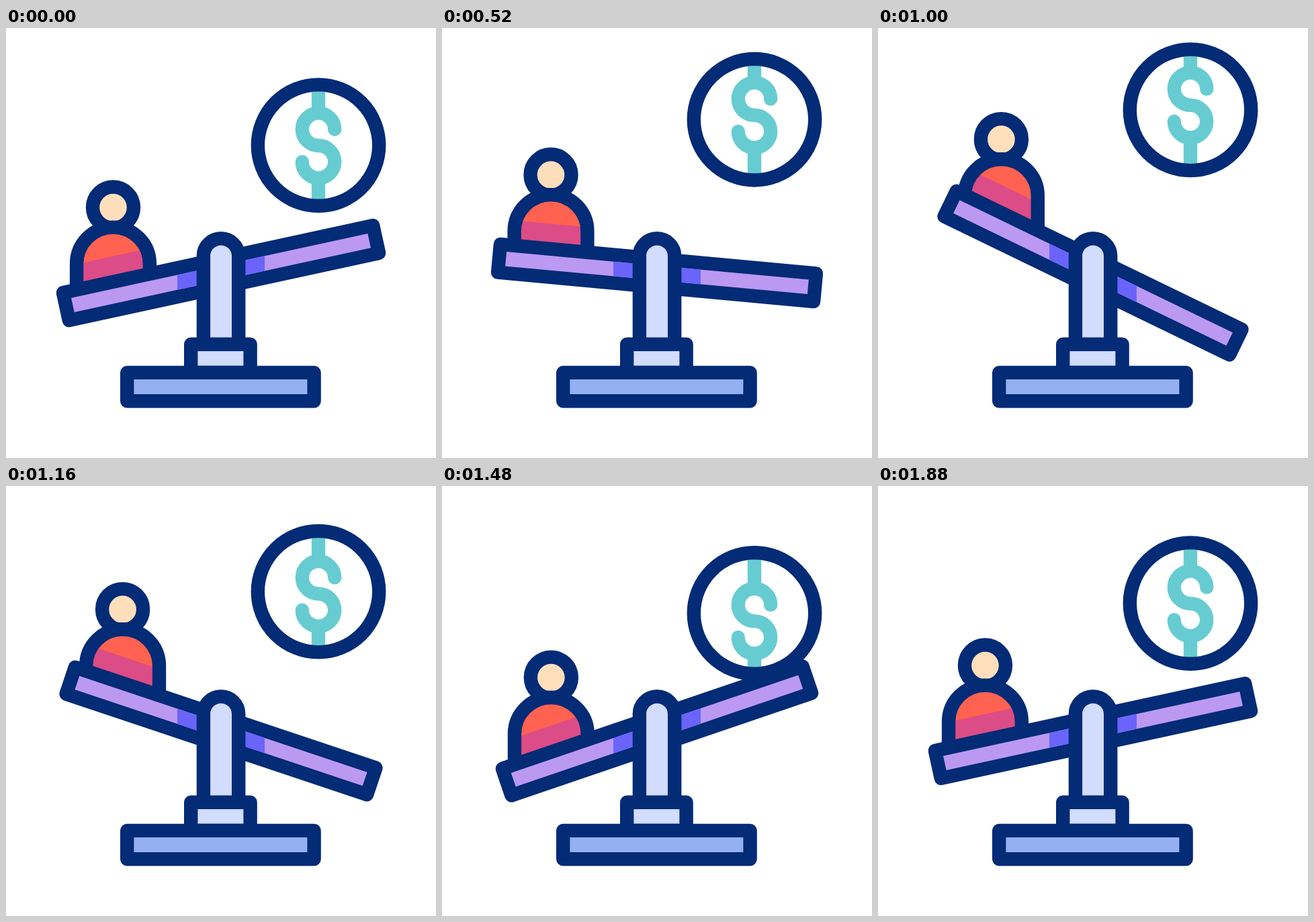
An HTML page with a canvas that plays this animation: 640 by 640 pixels, repeating every 2000 ms.

```html
<!DOCTYPE html>
<html lang="en">
<head>
<meta charset="utf-8">
<title>Seesaw</title>
<style>
  html, body { margin: 0; width: 100%; height: 100%; overflow: hidden; background: #fff; }
  canvas { display: block; width: 100vw; height: 100vh; }
</style>
</head>
<body>
<canvas id="stage"></canvas>
<script>
const SIZE = 640, LOOP = 2000, STEP = 40, LINE = 20.4;
const NAVY = '#042b76', TEAL = '#67ccd1', ORANGE = '#ff6250', PINK = '#dc4c86',
      SKIN = '#ffdfbb', LILAC = '#bb99f2', VIOLET = '#6a64fa', PALE = '#d2dcfd', BLUE = '#94b0f2';

const PIVOT = { x: 320, y: 364.5 };
const COIN = { x: 465, y: 174.6, r: 90.2 };

// Tracks: [time, value] pairs joined by sine easing
const TILT = [[56, 12.25], [1036, -26], [1499, 19], [1880, 12.25]];
const COIN_Y = [[28, 0], [885, -62.3], [1390, 16.5], [1830, 0]];
const SIGN_Y = [[28, 0], [870, -10.9], [1390, 12.4], [1850, 0]];

const canvas = document.getElementById('stage');
const ctx = canvas.getContext('2d');

function fit() {
  const dpr = window.devicePixelRatio || 1;
  canvas.width = Math.round(innerWidth * dpr);
  canvas.height = Math.round(innerHeight * dpr);
}

function track(keys, t) {
  if (t <= keys[0][0]) return keys[0][1];
  for (let i = 1; i < keys.length; i++) {
    const [t0, a] = keys[i - 1], [t1, b] = keys[i];
    if (t < t1) {
      const u = (t - t0) / (t1 - t0);
      return a + (b - a) * (1 - Math.cos(Math.PI * u)) / 2;
    }
  }
  return keys[keys.length - 1][1];
}

function paint(fill, stroke = NAVY) {
  if (fill) {
    ctx.fillStyle = fill;
    ctx.fill();
  }
  if (stroke) {
    ctx.strokeStyle = stroke;
    ctx.stroke();
  }
}

function box(x0, y0, x1, y1, fill, stroke) {
  ctx.beginPath();
  ctx.rect(x0, y0, x1 - x0, y1 - y0);
  paint(fill, stroke);
}

function disc(x, y, r, fill) {
  ctx.beginPath();
  ctx.arc(x, y, r, 0, Math.PI * 2);
  paint(fill);
}

function intoBeam(a) {
  ctx.translate(PIVOT.x, PIVOT.y);
  ctx.rotate(-a);
}

// The person rides on the beam but stays upright
function drawPerson(a) {
  const px = -158.5, py = -18, r = 54.4;
  const x = PIVOT.x - 1.8 + px * Math.cos(a) + py * Math.sin(a);
  const y = PIVOT.y - px * Math.sin(a) + py * Math.cos(a);
  const beamY = bx => PIVOT.y - (bx - PIVOT.x) * Math.tan(a);

  disc(x, y - 113.5, 30.5, SKIN);

  const body = new Path2D();
  body.moveTo(x - r, beamY(x - r));
  body.lineTo(x - r, y - 29.5);
  body.arc(x, y - 29.5, r, Math.PI, 0);
  body.lineTo(x + r, beamY(x + r));
  ctx.fillStyle = ORANGE;
  ctx.fill(body);
  ctx.save();
  ctx.clip(body);
  intoBeam(a);
  box(-300, -58.3, 0, 0, PINK, null);
  ctx.restore();
  ctx.strokeStyle = NAVY;
  ctx.stroke(body);
}

function drawBeam(a) {
  ctx.save();
  intoBeam(a);
  box(-236, -21, 236, 21, LILAC);
  ctx.restore();

  // Shadow near the post keeps upright edges while the beam tilts
  ctx.save();
  ctx.beginPath();
  ctx.rect(255, 0, 130, SIZE);
  ctx.clip();
  intoBeam(a);
  box(-226, -10.8, 226, 10.8, VIOLET, null);
  ctx.restore();
}

function drawStand() {
  ctx.beginPath();
  ctx.moveTo(293.9, 471);
  ctx.lineTo(293.9, 339.4);
  ctx.arc(320, 339.4, 26.2, Math.PI, 0);
  ctx.lineTo(346.2, 471);
  paint(PALE);
  box(275.2, 470.7, 363.6, 513, PALE);
  box(180.2, 512.9, 458.6, 555.2, BLUE);
}

function drawCoin(dy, sign) {
  const { x, r } = COIN, y = COIN.y + dy, mid = y + sign + 0.4, k = 24.2;

  ctx.save();
  ctx.beginPath();
  ctx.arc(x, y, r, 0, Math.PI * 2);
  ctx.clip();
  ctx.beginPath();
  ctx.moveTo(x, y - 100);
  ctx.lineTo(x, mid - 2 * k);
  ctx.moveTo(x, mid + 2 * k);
  ctx.lineTo(x, y + 100);
  paint(null, TEAL);
  ctx.lineCap = 'round';
  ctx.beginPath();
  ctx.arc(x, mid - k, k, 0, Math.PI / 2, true);
  ctx.arc(x, mid + k, k, -Math.PI / 2, Math.PI);
  paint(null, TEAL);
  ctx.restore();

  disc(x, y, r, null);
}

function draw(t) {
  const a = track(TILT, t) * Math.PI / 180;
  const scale = Math.min(canvas.width, canvas.height) / SIZE;
  ctx.setTransform(1, 0, 0, 1, 0, 0);
  ctx.fillStyle = '#fff';
  ctx.fillRect(0, 0, canvas.width, canvas.height);
  ctx.setTransform(scale, 0, 0, scale,
    (canvas.width - SIZE * scale) / 2, (canvas.height - SIZE * scale) / 2);
  ctx.lineWidth = LINE;
  ctx.lineJoin = 'round';
  ctx.lineCap = 'butt';
  drawPerson(a);
  drawBeam(a);
  drawStand();
  drawCoin(track(COIN_Y, t), track(SIGN_Y, t));
}

// The motion advances at 25 steps a second and rests at both ends
function pose(ms) {
  const t = Math.floor((ms % LOOP) / STEP) * STEP;
  return t < 80 ? 0 : Math.min(t, 1880);
}

const start = performance.now();
function tick() {
  draw(pose(Math.max(0, performance.now() - start)));
  requestAnimationFrame(tick);
}

addEventListener('resize', fit);
fit();
tick();
</script>
</body>
</html>
```
